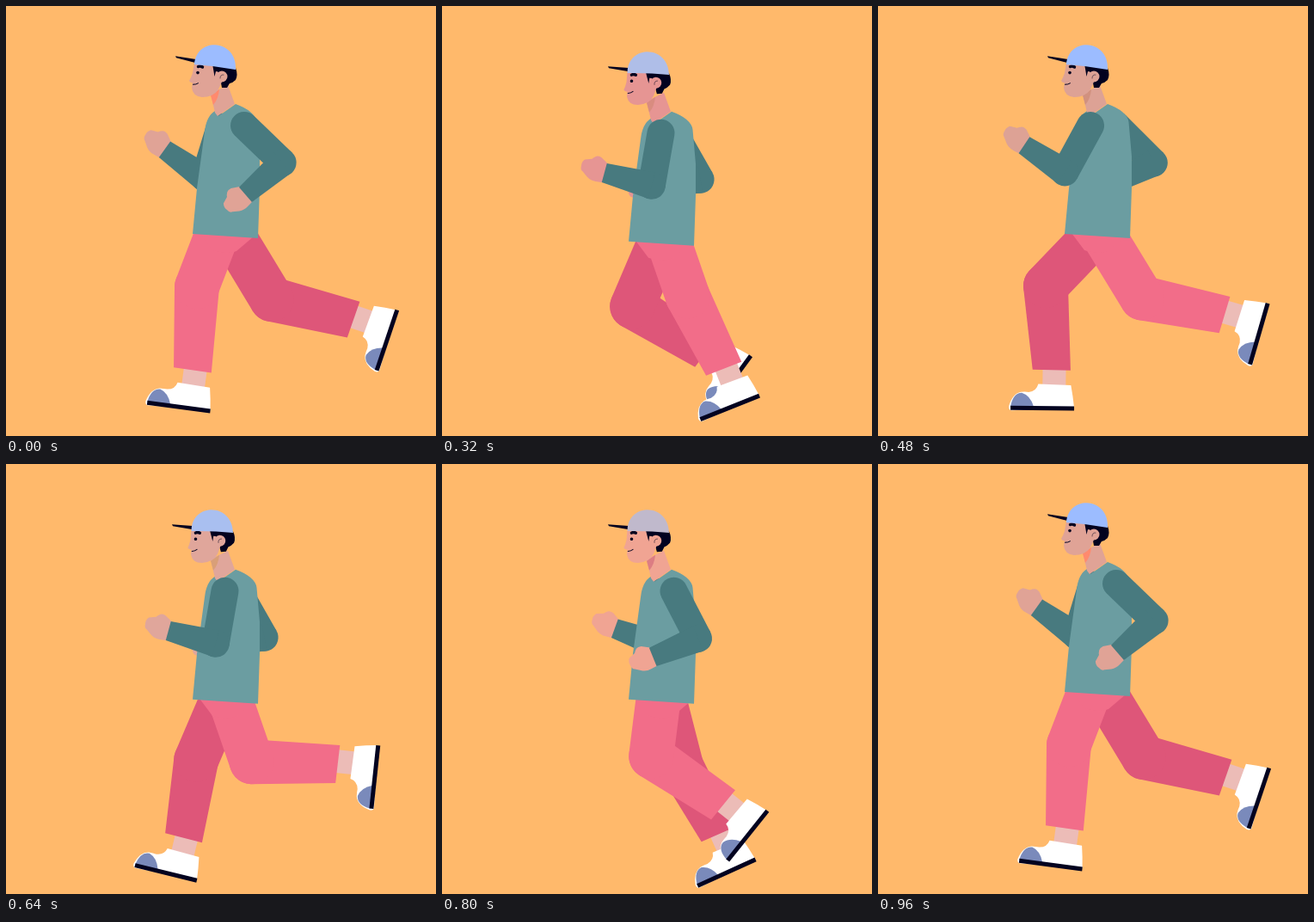
Animation of 500 by 500 pixels, one loop 1000 ms. Source, as an HTML page:

```html
<!DOCTYPE html>
<html lang="en">
<head>
<meta charset="utf-8">
<title>Runner</title>
<style>
  html, body { margin: 0; width: 100%; height: 100%; overflow: hidden; background: #ffb96b; }
  svg { display: block; width: 100vw; height: 100vh; }
  .skin { fill: var(--skin); }
  .cap { fill: var(--cap); }
  .shade { fill: var(--shade); }
  .ink { fill: #02021f; }
  .line { fill: none; stroke: #02021f; stroke-linecap: round; }
  .sleeve { fill: #487a7f; }
  .shirt { fill: #6b9da1; }
</style>
</head>
<body>
<svg id="stage" viewBox="0 0 500 500">
  <defs>
    <g id="foot">
      <path fill="#ecbcb7" d="M-11-6H16V20H-11Z"/>
      <path fill="#fff" d="M-16 16.500L22 17.500Q24.500 30 26 44L-47 47.500Q-50 47-50 43Q-46 28-36 26Q-31 25.500-27 26Q-18 25-16 16.500Z"/>
      <path fill="#7a8abb" d="M-48 43Q-45 27-35 27Q-25 30-21 43Z"/>
      <path class="ink" d="M-48 42H26V47H-48Z"/>
    </g>
    <g id="arm">
      <path class="sleeve" d="M-16 0A16 16 0 0 1 16 0V62H-16Z"/>
      <circle class="sleeve" cy="62" r="16"/>
    </g>
    <g id="forearm">
      <path class="skin" d="M-11.400 56L-16.500 65Q-17.500 69-16.200 71Q-14 74-12 75L-9 83Q-5 86-1 85Q4 85 5.200 81.500L9.800 75Q13 70 12.200 64L11.400 56Z"/>
      <path class="sleeve" d="M-15.800 0L-11.400 57H11.400L15.800 0Z"/>
    </g>
  </defs>

  <g id="farArm"><use href="#arm"/><use href="#forearm" transform="translate(0 62) rotate(108.5)"/></g>
  <g id="farLeg" fill="#de5679"></g>
  <g id="nearLeg" fill="#f26d89"></g>

  <g id="torso">
    <path fill="#f26d89" d="M225 264L240 284Q255 290 268 285L288 268Z"/>
    <path class="shirt" d="M217 265L222 212L231 146Q233 128 243 122L247 128L267 114Q278 118 284 123Q291 129 291.500 135L295 175V212L293 270Z"/>
    <path class="skin" d="M238 102L243 124L246 128L266 114L258 92Z"/>
    <path class="shade" d="M238 104L248 97Q247 108 241 115Z"/>
  </g>

  <g id="head">
    <path class="ink" d="M240 67L267 72Q270 80 267 86Q264 89 260 90L257 95L251 95L249 84Z"/>
    <path class="skin" d="M219 66L217 78Q215 84 213 87Q214 89 217 89.500L216 95Q217 105 228 106Q241 106 247 97L252 86L244 72L241 69Z"/>
    <path class="ink" d="M240 67L252 69L250 77L244 76L242.500 82Z"/>
    <circle class="skin" cx="251" cy="82" r="6.500"/>
    <path class="line" stroke-width=".5" d="M249 84Q249 79.500 253 80"/>
    <path class="line" stroke-width="3.400" d="M223.500 70.500Q226 69.300 228.500 71"/>
    <circle class="ink" cx="223" cy="77.600" r="1.800"/>
    <path class="line" stroke-width="1" d="M217.500 91.300Q221 91.500 223.500 89.800"/>
    <path class="ink" d="M197 58.300L221 62V66.300L198 60.300Z"/>
    <path class="cap" d="M219 68C220 53 231 45 243 45.300C258 46 268 58 267 74Q243 69.500 219 68Z"/>
  </g>

  <g id="nearArm"><use href="#arm"/><use href="#forearm" transform="translate(0 62) rotate(95.2)"/></g>
</svg>
<script>
const STEP = 40, LOOP = 1000, CYCLE = 24;
const { cos, sin, tan, floor, abs, PI } = Math;
const $ = id => document.getElementById(id);
const stage = $('stage');

// Six evenly spaced keys around one stride.
const tints = {
  skin: ['e0a396', 'eca3a8', 'e69593', 'dda295', 'e0a69b', 'f0a493'],
  cap: ['9cbcff', 'a3bcf2', 'afbee8', '9cbcff', 'a9bff0', 'c0b9cc'],
  shade: ['ff8a6e', 'cda068', 'd98c80', 'd1917f', 'd99f78', 'dc7d83']
};
// thigh, kneeX and kneeY hold harmonics: mean, cos, cos of double phase, sin.
const legs = {
  near: {
    shin: [-3, -4.3, 26.5, 78.5, 88.5, 56], length: [97, 97, 94, 98, 100, 101],
    thigh: [5.7, -26.2, -0.5, 0], kneeX: [264.5, -42.5, 0, 0], kneeY: [331, -6.5, 2, -5]
  },
  far: {
    shin: [4, -9.2, 29, 76, 89.5, 58.5], length: [98, 92, 90, 98, 101.5, 101],
    thigh: [-5, -37.5, -1.3, 0], kneeX: [250.5, -57, 1.5, 0], kneeY: [338.9, -7.75, -5.67, -3.1]
  }
};

for (const side of ['near', 'far']) {
  $(side + 'Leg').innerHTML = `
    <g class="shin"><use class="foot" href="#foot"/><path/></g>
    <path class="thigh" d="M-26 0V-115H26V0A26 26 0 0 1-26 0Z"/>`;
}

// Periodic interpolation through the six keys.
function wave(keys, phase) {
  return keys.reduce((sum, key, i) => {
    const x = phase - i * PI / 3;
    const weight = abs(sin(x / 2)) < 1e-6 ? 1 : sin(3 * x) / (6 * tan(x / 2));
    return sum + key * weight;
  }, 0);
}

function swing([mean, c1, c2, s1], phase) {
  return mean + c1 * cos(phase) + c2 * cos(2 * phase) + s1 * sin(phase);
}

function tint(keys, phase) {
  const channel = at => wave(keys.map(k => parseInt(k.slice(at, at + 2), 16)), phase);
  return `rgb(${[0, 2, 4].map(at => Math.round(channel(at))).join()})`;
}

function place(el, x, y, angle = 0) {
  el.setAttribute('transform', `translate(${x.toFixed(2)} ${y.toFixed(2)}) rotate(${angle.toFixed(2)})`);
}

function poseLeg(side, phase, bob) {
  const leg = legs[side], el = $(side + 'Leg');
  const x = swing(leg.kneeX, phase);
  const y = swing(leg.kneeY, phase) + bob;
  const len = wave(leg.length, phase);
  const shin = el.querySelector('.shin');
  place(el.querySelector('.thigh'), x, y, -swing(leg.thigh, phase));
  place(shin, x, y, -wave(leg.shin, phase));
  place(shin.querySelector('.foot'), 0.7, len, 4.6);
  shin.querySelector('path').setAttribute('d',
    `M-26 0L-22 ${len - 2}L22 ${len + 2}L26 0A26 26 0 0 0-26 0Z`);
}

function draw(ms) {
  const frame = floor((ms % LOOP) / STEP) % CYCLE;
  const phase = frame / CYCLE * 2 * PI;
  const c = cos(phase), dip = 1 - cos(2 * phase);
  const bob = 5.85 * dip;

  for (const name in tints) stage.style.setProperty('--' + name, tint(tints[name], phase));
  place($('torso'), 0, bob);
  $('head').setAttribute('transform', `translate(0 ${bob}) rotate(${-3.3 * dip} 232 107)`);
  place($('nearArm'), 262 + 15 * c, 139 + bob, -8.7 - 37.3 * c);
  place($('farArm'), 263 - 14 * c, 139.5 + c + bob, -14 + 31 * c);
  poseLeg('near', phase, bob);
  poseLeg('far', phase + PI, bob);
}

function tick() {
  draw(performance.now());
  requestAnimationFrame(tick);
}
tick();
</script>
</body>
</html>
```
